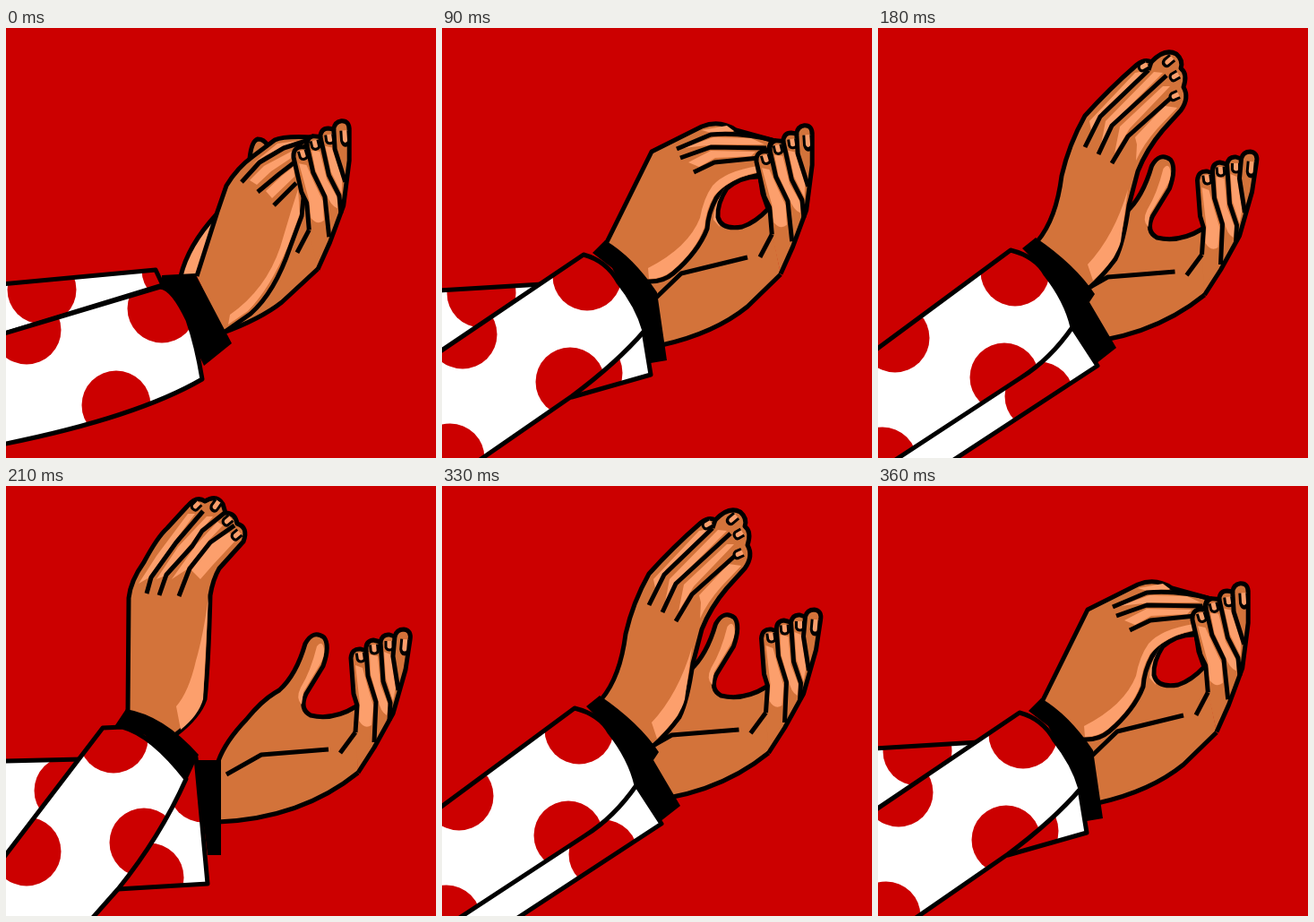
An HTML page with a canvas for the animation above (0.42 s loop, 480x480 px).

```html
<!DOCTYPE html>
<html lang="en">
<head>
<meta charset="utf-8">
<title>Clapping hands</title>
<style>
  html, body { margin: 0; width: 100%; height: 100%; overflow: hidden; background: #c00; }
  canvas { display: block; }
</style>
</head>
<body>
<canvas id="stage" width="480" height="480"></canvas>
<script>
const ctx = document.getElementById('stage').getContext('2d');
const RED = '#cc0000', SKIN = '#d3733a', GLOW = '#fc9f6c', INK = '#000', WHITE = '#fff';
const DOT_RADIUS = 38.5;

function fill(color, d) {
  ctx.fillStyle = color;
  ctx.fill(new Path2D(d));
}

function line(d, width = 5) {
  ctx.lineWidth = width;
  ctx.stroke(new Path2D(d));
}

function shape(color, d, width) {
  fill(color, d);
  line(d, width);
}

const glow = (...paths) => paths.forEach(d => fill(GLOW, d));
const lines = (...paths) => paths.forEach(d => line(d));
const cuff = d => fill(INK, d);

function sleeve(d, dots) {
  fill(WHITE, d);
  ctx.save();
  ctx.clip(new Path2D(d));
  ctx.fillStyle = RED;
  for (const [x, y] of dots) {
    ctx.beginPath();
    ctx.arc(x, y, DOT_RADIUS, 0, Math.PI * 2);
    ctx.fill();
  }
  ctx.restore();
  line(d);
}

// Nail with its open end towards the fingertip.
function nail(x, y, degrees = 0, stretch = 1) {
  ctx.save();
  ctx.translate(x, y);
  ctx.rotate(degrees * Math.PI / 180);
  ctx.scale(1, stretch);
  shape(GLOW, 'M-4 -5 L-4 2 Q-3 5 0 5 Q4 5 4 2 L4 -5', 3);
  ctx.restore();
}

// Fingers of the far hand, anchored at the heel of the little finger (393, 320).
function fingers(x, y, degrees) {
  ctx.save();
  ctx.translate(x, y);
  ctx.rotate(degrees * Math.PI / 180);
  ctx.translate(-393, -320);
  shape(SKIN, 'M390 275 L392 245 L388 232 L385 192 Q386 181 396 182 L402 184 Q401 173 410 172 L418 174 Q420 165 428 166 L434 168 Q436 160 444 160 Q453 161 451 172 L446 205 L432 254 L411 292 L393 320');
  glow(
    'M390 200 L398 203 L404 225 L410 245 L408 267 Q400 272 394 262 L395 243Z',
    'M406 188 L415 190 L418 222 L427 245 L425 256 Q418 252 415 238 L407 210Z',
    'M422 185 L429 188 L435 225 L432 240 L424 215Z'
  );
  lines(
    'M373 298 L390 275',
    'M402 184 L404 212 L413 241 L411 286',
    'M418 174 L421 218 L429 242 L428 262',
    'M434 168 L432 190 L438 228'
  );
  nail(396, 191, -8);
  nail(411, 182, -5);
  nail(428, 178);
  nail(445, 179, 5, 1.6);
  ctx.restore();
}

function openHand(dx, dy) {
  ctx.save();
  ctx.translate(dx, dy);
  shape(SKIN, 'M391 246 Q365 262 340 256 Q327 249 335 232 L354 201 Q362 178 355 169 Q343 160 334 176 Q324 211 305 228 L300 231 Q285 240 268 261 Q245 285 237 307 V375 Q330 371 393 320');
  glow('M347 179 Q353 171 355 182 Q356 190 350 200 L332 230 L330 244 Q323 237 329 225 Q340 207 347 179Z');
  line('M246 322 L285 300 L360 294');
  fingers(393, 320, 0);
  ctx.restore();
}

function closed() {
  fill(SKIN, 'M338 195 L250 250 L243 340 Q284 325 308 306 L348 269Z');
  line('M240 341 Q284 325 308 306 L348 269');
  shape(GLOW, 'M195 277 Q203 243 235 208 L245 215 L213 277');
  shape(SKIN, 'M272 146 Q274 126 281 124 Q288 124 292 131');
  shape(SKIN, 'M213 277 L236 205 L246 176 Q258 156 276 143 L300 125 Q310 120 345 122 L325 140 L332 190 L330 210 L317 245 Q300 295 273 319 L243 340');
  glow(
    'M326 180 L328 207 L314 245 Q295 290 270 316 L248 331 L250 320 Q290 292 306 245 L318 205Z',
    'M275 152 L303 129 L325 126 L290 142Z',
    'M272 170 L288 154 L320 137 L320 144 L296 160 L280 175Z',
    'M290 182 L308 165 L321 155 L322 166 L297 190Z'
  );
  lines('M263 172 L283 150 L310 134 L338 125', 'M281 183 L305 163 L322 150', 'M299 198 L324 173');
  fingers(348, 269.5, -8.6);
  sleeve('M-5 286 L167 270 L175 287 L-5 342Z', [[40, 292], [190, 270]]);
  cuff('M174 276 L211 274 L252 352 L221 377 L208 350 L195 310 L174 287Z');
  sleeve('M-5 342 L172 289 Q186 290 203 326 Q213 355 219 392 Q145 435 -5 465Z', [[23, 337], [174, 313], [123, 421]]);
}

function parting() {
  fill(SKIN, 'M362 195 L300 190 L230 285 L247 354 Q304 341 341 311 L378 275Z');
  line('M245 354 Q304 341 341 311 L378 275');
  shape(SKIN, 'M183 241 L234 138 L290 110 Q310 102 328 114 L368 125 L354 164 Q318 172 306 190 Q297 207 296 224 Q286 250 258 274 Q246 284 229 283');
  glow(
    'M352 154 Q316 160 302 176 Q292 190 288 212 Q275 245 230 268 L231 280 Q246 280 257 271 Q283 249 293 222 Q294 204 304 187 Q320 168 352 161Z',
    'M290 114 L318 109 L326 115 L300 117Z',
    'M270 134 L303 122 L345 123 L360 130 L305 130Z',
    'M275 150 L300 137 L350 138 L345 143 L305 145 L287 155Z',
    'M316 178 Q303 198 303 214 L310 222 Q307 200 320 178Z'
  );
  lines(
    'M262 135 L300 119 Q335 116 372 126',
    'M266 145 L300 133 L362 134',
    'M281 161 L304 150 L354 145',
    'M237 303 L267 274 L341 256'
  );
  shape(RED, 'M318 179 Q335 165 355 166 L358 185 L364 202 Q350 217 335 222 Q312 226 308 211 Q307 196 318 179Z');
  fingers(378, 274.5, -8.6);
  sleeve('M-5 293 L112 286 L225 338 L233 387 L145 412 L-5 363Z', [[44, 296], [163, 385]]);
  cuff('M168 251 L182 237 Q213 255 240 295 L251 371 L233 374 L226 340 L190 268Z');
  sleeve('M-5 363 L158 253 Q184 260 197 284 Q218 310 226 338 Q195 374 145 411 L38 485 H-5Z', [[162, 277], [23, 342], [143, 395], [9, 480]]);
}

function opening() {
  openHand(-28.5, -22);
  shape(SKIN, 'M178 238 Q199 213 205 165 Q213 130 231 98 Q258 68 289 41 Q298 34 305 38 Q320 22 333 29 Q341 36 338 45 Q346 51 341 66 Q348 78 338 92 L318 114 Q300 135 290 160 L280 198 Q274 240 265 258 Q250 278 236 290');
  glow(
    'M279 180 Q264 232 234 264 L240 282 Q266 258 271 238Z',
    'M236 104 L287 50 L298 48 L250 93 L238 114Z',
    'M254 104 L308 49 L318 50 L266 102 L249 130Z',
    'M270 110 L318 65 L326 65 L281 112 L264 140Z',
    'M287 122 L320 87 L334 89 L312 112 Q296 130 288 148 L289 130Z'
  );
  lines('M231 133 L248 99 L302 47', 'M246 141 L261 109 L322 53', 'M261 151 L279 121 L328 77', 'M305 38 L302 47');
  nail(296, 43, 60);
  nail(324, 37, 50, 1.2);
  nail(331, 54, 60);
  nail(331, 76, 65);
  sleeve('M217 334 L245 377 L80 485 H15Z', [[180, 411]]);
  cuff('M161 246 L176 234 Q220 264 242 297 L236 306 L266 357 L243 375 L217 334 L185 270Z');
  sleeve('M-5 361 L148 248 Q176 255 187 275 Q210 304 217 334 Q192 370 160 390 L15 485 H-5Z', [[153, 272], [19, 346], [141, 390], [5, 484]]);
}

function apart() {
  openHand(0, 0);
  shape(SKIN, 'M136 252 L137 125 Q139 106 154 85 Q169 57 180 47 L202 23 Q213 10 222 17 Q235 9 242 20 L245 30 Q256 30 258 42 Q271 46 265 62 L238 92 Q231 104 228 122 Q226 200 222 238 Q215 258 190 277');
  glow(
    'M226 124 Q220 168 212 195 Q204 230 190 246 L195 272 Q215 256 220 238Z',
    'M148 109 L168 78 L203 31 L211 31 L185 66 L160 102Z',
    'M168 104 L192 68 L224 34 L231 34 L215 53 L178 100Z',
    'M185 104 L212 66 L236 40 L242 44 L226 61 L202 93Z',
    'M207 94 L232 62 L249 52 L257 60 L231 88 L217 104Z'
  );
  lines('M157 120 L162 102 L190 63 L220 28', 'M171 122 L179 99 L208 67 L219 50 L244 30', 'M193 123 L205 92 L228 63 L255 44');
  nail(212, 22, 45);
  nail(234, 22, 35, 1.2);
  nail(247, 39, 50);
  nail(257, 55, 50);
  sleeve('M-5 307 L85 305 L212 303 L225 444 L125 450 L-5 418Z', [[70, 340], [220, 337], [160, 437]]);
  cuff('M212 306 H240 V412 H225Z');
  cuff('M122 267 L134 249 Q176 256 215 300 L203 326 L155 278Z');
  sleeve('M-5 418 L108 270 L130 269 Q163 278 201 327 Q172 392 125 450 L94 485 H-5Z', [[120, 282], [23, 408], [154, 398]]);
}

const LOOP = 420;
const poses = [[0, closed], [90, parting], [150, opening], [210, apart], [300, opening], [360, parting]];

function draw() {
  const time = performance.now() % LOOP;
  const [, pose] = poses.findLast(([start]) => start <= time);
  ctx.fillStyle = RED;
  ctx.fillRect(0, 0, 480, 480);
  ctx.strokeStyle = INK;
  ctx.lineJoin = 'round';
  pose();
  requestAnimationFrame(draw);
}
draw();
</script>
</body>
</html>
```
